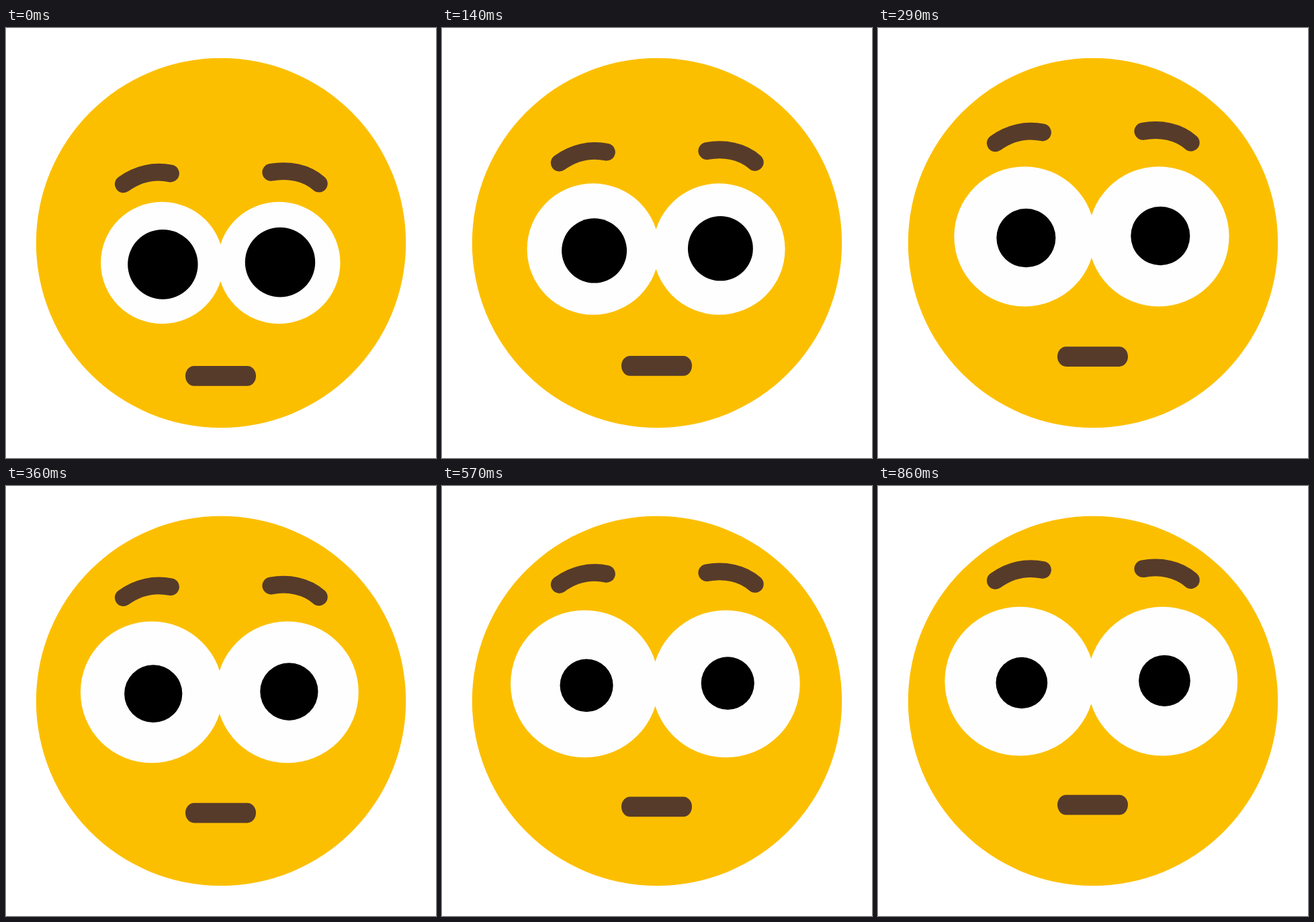
An HTML page that plays this animation: 640 by 640 pixels, repeating every 0.93 s.

```html
<!DOCTYPE html>
<html lang="en">
<head>
<meta charset="utf-8">
<title>Wide eyes</title>
<style>
  html, body { margin: 0; width: 100%; height: 100%; overflow: hidden; background: #fff; }
  svg { display: block; width: 100%; height: 100%; }
</style>
</head>
<body>
<svg viewBox="0 0 640 640">
  <circle cx="320" cy="319.9" r="275.2" fill="#fcbf00"/>
  <g id="brows" fill="none" stroke="#573b2a" stroke-width="25.8" stroke-linecap="round">
    <path d="M174.8 232.4C196 217 221 211.5 245 216.5"/>
    <path d="M394.3 214.8C420 210 447 215 465.8 231.6"/>
  </g>
  <g id="eyes"></g>
  <rect id="mouth" x="267" y="503" width="105" height="29.8" rx="13" ry="14.9" fill="#573b2a"/>
</svg>
<script>
  const LOOP = 930;
  const POSES = 13;
  const RATE = 25;
  const LAST = 21;
  const $ = id => document.getElementById(id);
  const lerp = (a, b, p) => a + (b - a) * p;

  function addEllipse(fill) {
    const el = document.createElementNS('http://www.w3.org/2000/svg', 'ellipse');
    el.setAttribute('fill', fill);
    return $('eyes').appendChild(el);
  }

  function place(el, cx, cy, r) {
    el.setAttribute('cx', cx);
    el.setAttribute('cy', cy);
    el.setAttribute('rx', r * 1.006);
    el.setAttribute('ry', r);
  }

  // Whites of both eyes lie below both pupils
  const sides = [-1, 1];
  const whites = sides.map(() => addEllipse('#fefefe'));
  const pupils = sides.map(() => addEllipse('#000'));

  // Held poses, two of them 10 ms longer than the rest
  const starts = Array.from({ length: POSES }, (_, n) => 70 * n + 10 * (n > 3) + 10 * (n > 10));

  // Ease out, sampled on whole ticks of the clock
  function progress(ms) {
    const pose = starts.filter(s => s <= ms).length - 1;
    const x = Math.floor(pose * LOOP / POSES * RATE / 1000) / LAST;
    return 1 - Math.pow(1 - x, 2.78 - 0.65 * x * x);
  }

  function draw(ms) {
    const p = progress(ms % LOOP);
    const r = lerp(90.7, 110.9, p);
    const cy = lerp(349.5, 290.7, p);
    sides.forEach((side, i) => {
      const cx = lerp(319.25, 317.3, p) + side * lerp(86.95, 106.3, p);
      const dx = lerp(1.45 + 0.35 * side, 2.85, p);
      place(whites[i], cx, cy, r);
      place(pupils[i], cx + dx, cy + 0.7 - 1.6 * side, r * lerp(0.572, 0.344, p));
    });
    $('brows').setAttribute('transform', `translate(0 ${-91.6 * p})`);
    $('mouth').setAttribute('transform', `translate(0 ${-43.3 * p})`);
  }

  const begin = performance.now();
  function loop() {
    draw(performance.now() - begin);
    requestAnimationFrame(loop);
  }
  loop();
</script>
</body>
</html>
```
